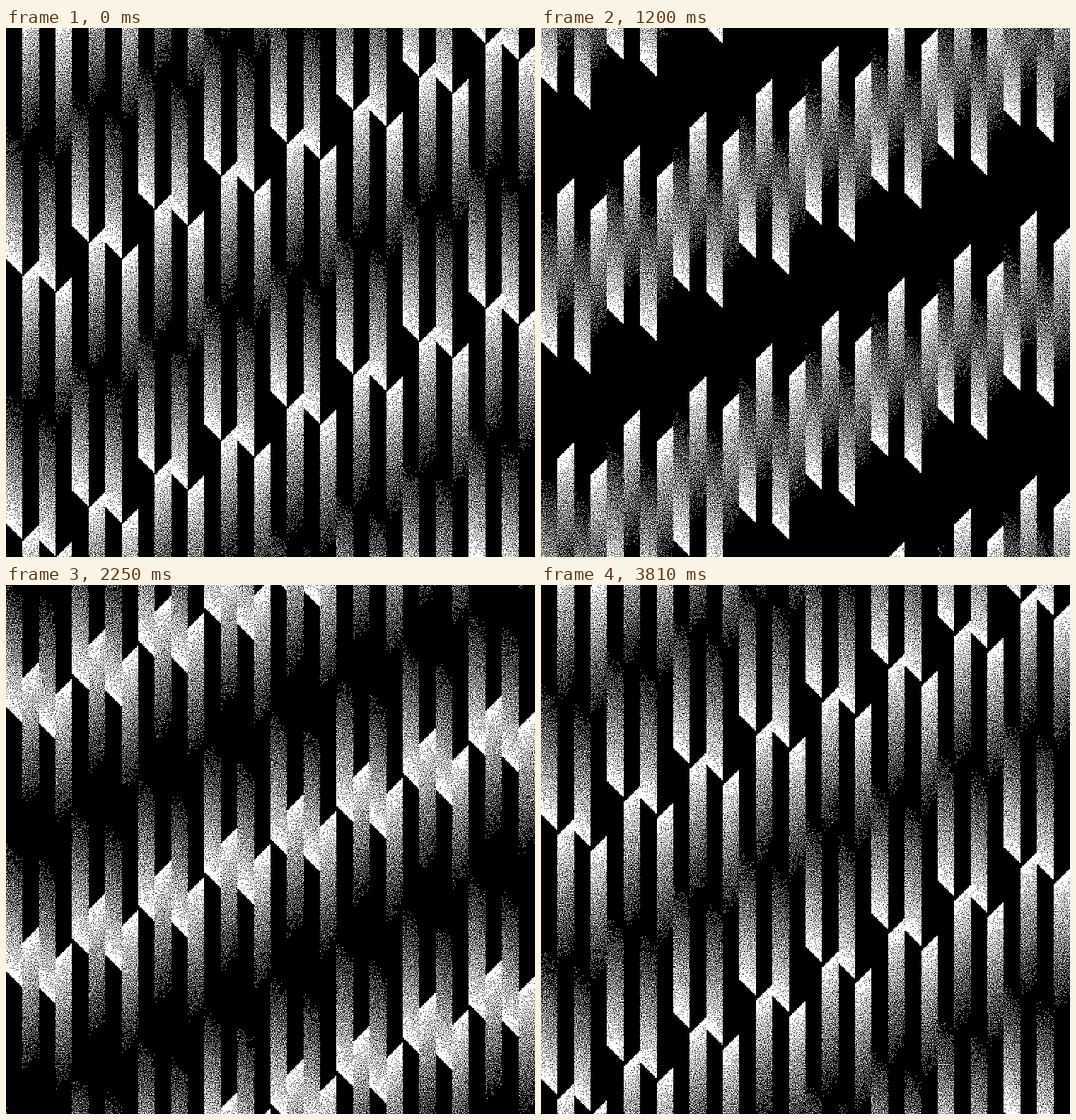
These frames come from a looping animation (748x748 px, 3840 ms). An HTML page with a canvas:

```html
<!DOCTYPE html>
<html lang="en">
<head>
<meta charset="utf-8">
<title>Dithered columns</title>
<style>
  html, body { margin: 0; width: 100%; height: 100%; overflow: hidden; background: #000; }
  canvas { display: block; width: 100vw; height: 100vh; image-rendering: pixelated; }
</style>
</head>
<body>
<canvas id="stage" width="748" height="748"></canvas>
<script>
const SIZE = 748;
const COLUMN = SIZE / 32;
const CELLS = 10;              // stairs across a slanted tip
const CELL = COLUMN / CELLS;   // tips snap to this grid
const PERIOD = SIZE / 2;
const BAR = PERIOD / 2;
const FRAME_MS = 30;
const FRAMES = 128;
const WHITE = 0xffffffff;
const BLACK = 0xff000000;

const ctx = document.getElementById('stage').getContext('2d');
const image = ctx.createImageData(SIZE, SIZE);
const pixels = new Uint32Array(image.data.buffer);

let seed = 7;
function random() {
  seed = (seed + 0x6d2b79f5) | 0;
  let n = Math.imul(seed ^ (seed >>> 15), seed | 1);
  n ^= n + Math.imul(n ^ (n >>> 7), n | 61);
  return ((n ^ (n >>> 14)) >>> 0) / 2 ** 32;
}

function shuffle(list) {
  for (let i = list.length - 1; i > 0; i--) {
    const j = Math.floor(random() * (i + 1));
    [list[i], list[j]] = [list[j], list[i]];
  }
  return list;
}

// A pixel is lit while its distance behind the bar's tip is below its reach.
// Each 2x2 block gets one value from every quarter of the range, for an even grain.
const reach = new Float32Array(SIZE * SIZE);
const quarters = [0, 1, 2, 3];
for (let y = 0; y < SIZE; y += 2) {
  for (let x = 0; x < SIZE; x += 2) {
    shuffle(quarters).forEach((quarter, k) => {
      reach[(y + (k >> 1)) * SIZE + x + (k & 1)] = (quarter + random()) / 4 * BAR;
    });
  }
}

const mod = (a, n) => ((a % n) + n) % n;

// Tip positions in cells: even columns point down and sink, odd ones point up and rise.
const tips = Array.from({ length: SIZE }, (_, x) => {
  const cellX = Math.floor((x + 0.5) / CELL);
  const column = Math.floor(cellX / CELLS);
  const stair = cellX % CELLS;
  const pair = (column >> 1) % 2;
  const group = column >> 2;
  const base = CELLS * (15 + pair - 2 * group);
  return column % 2
    ? { cell: base - stair, dir: -1 }
    : { cell: base - CELLS + stair, dir: 1 };
});

function draw(frame) {
  const shift = frame / FRAMES * PERIOD / CELL;
  for (let x = 0; x < SIZE; x++) {
    const { cell, dir } = tips[x];
    const tip = Math.round(cell + dir * shift) * CELL;
    let behind = mod(dir * (tip - 0.5), PERIOD);
    for (let y = 0, i = x; y < SIZE; y++, i += SIZE) {
      pixels[i] = behind < reach[i] ? WHITE : BLACK;
      behind -= dir;
      if (behind < 0) behind += PERIOD;
      else if (behind >= PERIOD) behind -= PERIOD;
    }
  }
  ctx.putImageData(image, 0, 0);
}

const startTime = performance.now();
let shown = -1;
function tick() {
  const frame = Math.floor((performance.now() - startTime) / FRAME_MS) % FRAMES;
  if (frame !== shown) draw(shown = frame);
  requestAnimationFrame(tick);
}
tick();
</script>
</body>
</html>
```
